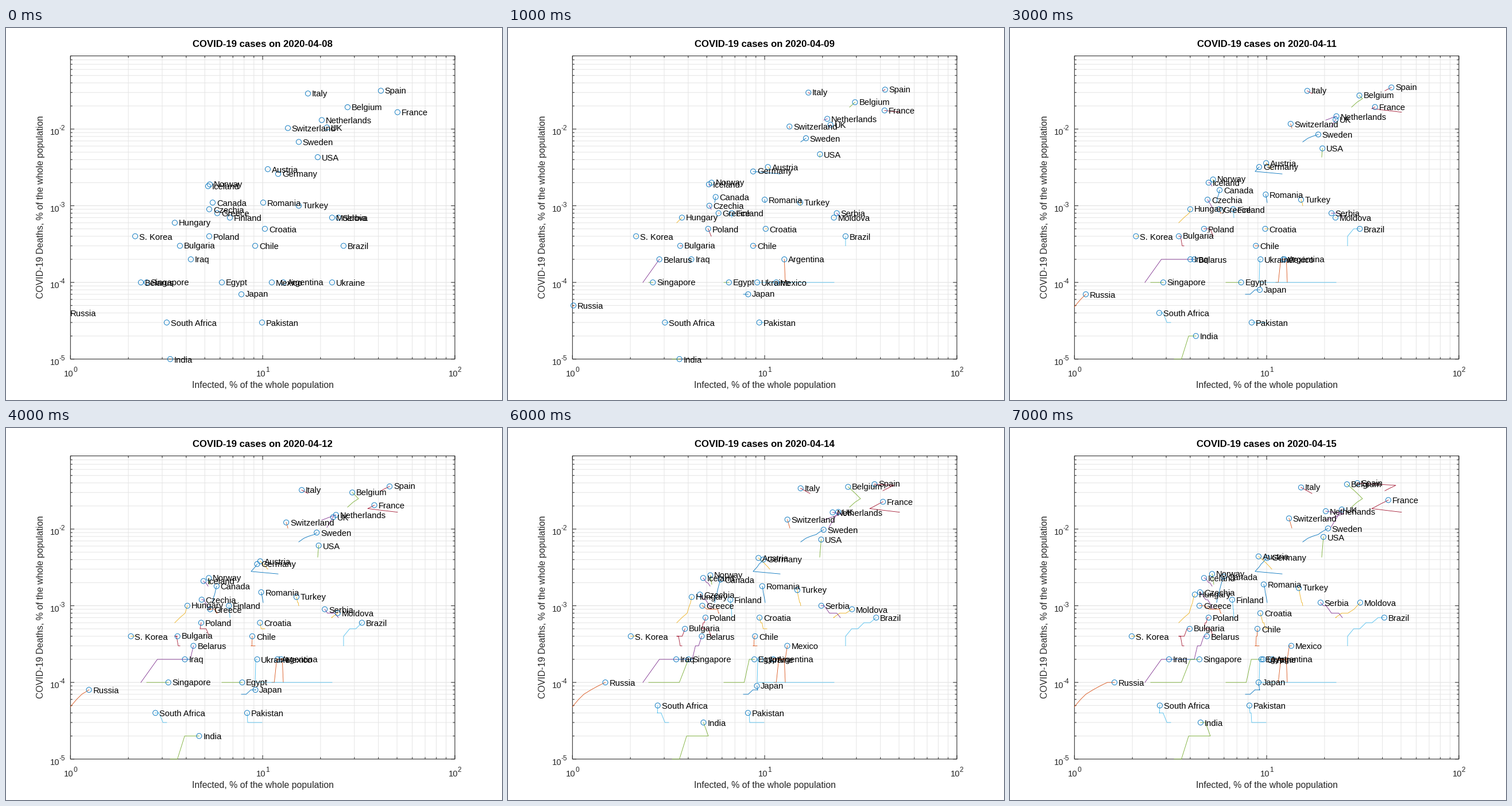
A matplotlib script that plays this animation: 864 by 648 pixels, repeating every 8 s.

```python
import math

import matplotlib.pyplot as plt
import numpy as np
from matplotlib.animation import FuncAnimation
from matplotlib.patches import Circle, Rectangle

W, H = 864, 648
LEFT, RIGHT = 0.13 * W, 0.905 * W
TOP, BOTTOM = 0.075 * H, 0.89 * H
DECADE_X = (RIGHT - LEFT) / 2
DECADE_Y = (BOTTOM - TOP) / math.log10(9000)
DAYS = 8
INK = "#262626"
COLORS = ["#0072bd", "#d95319", "#edb120", "#7e2f8e", "#77ac30", "#4dbeee", "#a2142f"]

plt.rcParams["font.family"] = "Liberation Sans"
fig = plt.figure(figsize=(W / 72, H / 72), dpi=72, facecolor="white")
ax = fig.add_axes([0, 0, 1, 1])
ax.set_xlim(0, W)
ax.set_ylim(H, 0)
ax.axis("off")


def segment(x, y, color=INK, z=1):
    ax.plot(x, y, color=color, lw=1, zorder=z, solid_capstyle="butt", snap=False)


def write(x, y, s, size=14.8, color=INK, **kw):
    return ax.text(x, y, s, fontsize=size, color=color, va="baseline", **kw)


def draw_scale():
    for decade in range(4):
        for m in range(1, 10):
            step = decade + math.log10(m)
            shade = "#dedede" if m == 1 else "#e5e5e5"
            tick = 6.7 if m == 1 else 3.4
            x, y = LEFT + step * DECADE_X, BOTTOM - step * DECADE_Y
            if x <= RIGHT + 0.1:
                segment([x, x], [TOP, BOTTOM], shade)
                segment([x, x], [BOTTOM, BOTTOM - tick], z=2)
                segment([x, x], [TOP, TOP + tick], z=2)
            if y >= TOP - 0.5:
                segment([LEFT, RIGHT], [y, y], shade)
                segment([LEFT, LEFT + tick], [y, y], z=2)
                segment([RIGHT, RIGHT - tick], [y, y], z=2)
    segment([LEFT, RIGHT, RIGHT, LEFT, LEFT], [TOP, TOP, BOTTOM, BOTTOM, TOP], z=2)


def power(x, y, exponent):
    write(x, y, "10")
    write(x + 16.4, y - 8, str(exponent), size=11.8)


def draw_labels():
    for e in range(3):
        power(LEFT + e * DECADE_X - 11.5, 607, e)
    for e in range(4):
        power(76.5, BOTTOM - e * DECADE_Y + 10, e - 5)
    write(447.5, 627, "Infected, % of the whole population", 15.85, ha="center")
    write(64.8, 312, "COVID-19 Deaths, % of the whole population", 15.9,
          ha="center", rotation=90, rotation_mode="anchor")


def climb(first, last, lag):
    """Exponential growth in whole steps; lag above 1 delays it."""
    t = (np.arange(DAYS) / (DAYS - 1)) ** lag
    unit = 0.1 if first < 1 else 1
    return np.ceil(first * (last / first) ** t / unit - 0.1) * unit


def drift(xs, turn):
    """Straight run from first to last x, or by way of a turning point."""
    days = [0, turn, DAYS - 1] if len(xs) == 3 else [0, DAYS - 1]
    return np.interp(range(DAYS), days, xs)


draw_scale()
draw_labels()
title = write(447, 33, "", 16.8, "black", ha="center", weight="bold")
frame_clip = Rectangle((LEFT, TOP), RIGHT - LEFT, BOTTOM - TOP + 1,
                       transform=ax.transData)
tracks = []


class Track:
    """One country: drift in screen x, growth in deaths per million."""

    def __init__(self, name, xs, first, last, turn=3, lag=1):
        self.x = drift(xs, turn)
        self.y = BOTTOM - DECADE_Y * (np.log10(climb(first, last, lag)) + 1)
        color = COLORS[(len(tracks) + 1) % len(COLORS)]
        self.trail, = ax.plot([], [], color=color, lw=0.85, zorder=3, snap=False)
        self.trail.set_clip_path(frame_clip)
        self.dot = ax.add_patch(Circle((0, 0), 4.5, fill=False, ec=COLORS[0],
                                       lw=0.9, zorder=4))
        self.label = write(0, 0, name, color="black", zorder=5)
        self.drop = 4.6 if set(name) & set("gpqy") else 5.8
        tracks.append(self)

    def show(self, day):
        x, y = self.x[day], self.y[day]
        self.trail.set_data(self.x[:day + 1], self.y[:day + 1])
        self.dot.center = x, y
        self.dot.set_visible(bool(x >= LEFT))
        self.label.set_position((x + 6.8, y + self.drop))


# Alphabetical order sets the trail colours.
Track("Argentina", (483, 478, 457), 1, 2)
Track("Austria", (456, 433), 30, 44)
Track("Belarus", (235, 321, 343), 1, 4)
Track("Belgium", (595, 614, 587), 193, 384, turn=2, lag=0.8)
Track("Brazil", (588, 588, 652), 3, 7, turn=1, lag=0.7)
Track("Bulgaria", (303, 294, 313), 3, 5, lag=2)
Track("Canada", (360, 372), 11, 24)
Track("Chile", (434, 427, 431), 3, 5, turn=1, lag=4)
Track("Croatia", (451, 436), 5, 8, lag=4)
Track("Czechia", (354, 331), 9, 15)
Track("Egypt", (376, 438), 1, 2, lag=4)
Track("Finland", (390, 387), 7, 12)
Track("France", (682, 630, 659), 166, 239, turn=2)
Track("Germany", (474, 427, 448), 26, 42, turn=1)
Track("Greece", (368, 364, 330), 8, 10, lag=2)
Track("Hungary", (294, 312, 322), 6, 14, turn=2)
Track("Iceland", (352, 338), 18, 23)
Track("India", (286, 349, 332), 0.1, 0.3, turn=5, lag=1.5)
Track("Iraq", (322, 309, 277), 2, 2, turn=5)
Track("Italy", (526, 507), 291, 349)
Track("Japan", (410, 435, 433), 0.7, 1, lag=2)
Track("Mexico", (463, 476, 490), 1, 3, lag=1.5)
Track("Moldova", (568, 567, 610), 7, 11, lag=5)
Track("Netherlands", (550, 581, 550), 131, 171, turn=5)
Track("Norway", (355, 352), 19, 26)
Track("Pakistan", (446, 421, 417), 0.3, 0.5, lag=4)
Track("Poland", (354, 338, 346), 4, 7)
Track("Romania", (448, 442), 11, 19)
Track("Russia", (105, 132, 182), 0.4, 1, lag=0.7)
Track("S. Korea", (225, 212), 4, 4)
Track("Serbia", (579, 560, 541), 7, 11, lag=1.5)
Track("Singapore", (245, 267, 330), 1, 2, lag=9)
Track("South Africa", (280, 260, 261), 0.3, 0.5, lag=1.5)
Track("Spain", (653, 672, 605), 316, 397, turn=5)
Track("Sweden", (510, 537, 554), 68, 102, lag=0.7)
Track("Switzerland", (491, 486), 103, 138)
Track("Turkey", (510, 503), 10, 17, lag=1.5)
Track("UK", (559, 578), 105, 180)
Track("USA", (543, 546), 43, 79)
Track("Ukraine", (568, 434, 441), 1, 2, turn=1, lag=1.5)


def update(day):
    title.set_text(f"COVID-19 cases on 2020-04-{8 + day:02d}")
    for track in tracks:
        track.show(day)


anim = FuncAnimation(fig, update, frames=DAYS, interval=1000, repeat=True,
                     repeat_delay=0, init_func=lambda: update(0))
plt.show()
```
